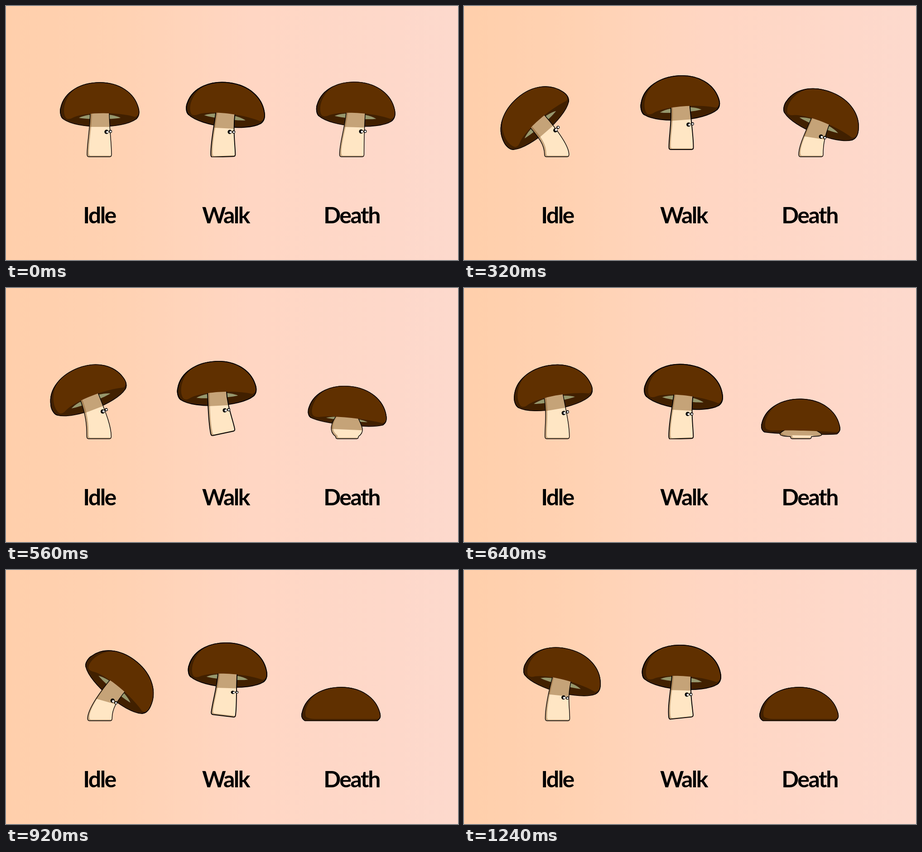
These frames come from a looping animation (998 px wide and 561 px high, 1280 ms). An HTML page with a canvas:

```html
<!DOCTYPE html>
<html lang="en">
<head>
<meta charset="utf-8">
<title>Mushroom animations</title>
<style>
  html, body { margin: 0; width: 100%; height: 100%; overflow: hidden; }
  body { background: linear-gradient(90deg, #ffcfab 0%, #ffd2b3 26%, #ffd6c3 54%, #fdd9cd 100%); }
  canvas, svg { position: absolute; left: 0; top: 0; width: 100%; height: 100%; }
  text { font: 700 50px Lato, "Open Sans", sans-serif; letter-spacing: -2.5px; text-anchor: middle; }
</style>
</head>
<body>
<canvas id="stage" width="998" height="561"></canvas>
<svg viewBox="0 0 998 561">
  <text x="206" y="480">Idle</text>
  <text x="485" y="480">Walk</text>
  <text x="763" y="480">Death</text>
</svg>
<script>
const ctx = document.getElementById('stage').getContext('2d');
const LOOP = 1280, STEP = 40, GROUND = 334;
const RAD = Math.PI / 180;

// time, cap x, cap y, cap tilt
const idleKeys = [
  [0, 207, 240, 0], [200, 174, 247, -28], [320, 164, 257, -41],
  [560, 185, 243, -21], [760, 222, 240, 11], [920, 244, 258, 40],
  [980, 245, 260, 42], [1240, 215, 244, 15], [1280, 207, 240, 0]
];
// time, cap x, cap y, cap tilt, foot y, foot tilt, eye opening
const walkKeys = [
  [0, 484, 240, 7, 333, -2, 1], [120, 503, 250, 32, 333, 0, .3],
  [200, 503, 248, 27, 333, 0, .35], [280, 489, 232, 4, 322, 7, .75],
  [320, 478, 225, -4, 317, 0, 1], [420, 464, 218, -9, 310, -7, 1],
  [520, 460, 227, -8, 317, -13, 1], [560, 466, 233, -3, 321, -12, 1],
  [600, 480, 237, 4, 327, -6, 1], [640, 484, 240, 7, 333, -2, 1]
];
// time, cap x, cap y, cap tilt, foot x, flatness
const deathKeys = [
  [0, 772, 239, 4, 763.5, 0], [200, 788, 247, 24, 766, 0],
  [320, 786, 257, 22, 766, 0], [440, 772, 271, 16, 761, .2],
  [560, 753, 288, 6, 753, .5], [700, 740, 330, 0, 740, 1],
  [1280, 740, 330, 0, 740, 1]
];

// Smooth interpolation that never overshoots a key
function sample(keys, t) {
  let i = 0;
  while (i < keys.length - 2 && t >= keys[i + 1][0]) i++;
  const a = keys[i], b = keys[i + 1], span = b[0] - a[0], u = (t - a[0]) / span;
  const rate = (j, c) => (keys[j + 1][c] - keys[j][c]) / (keys[j + 1][0] - keys[j][0]);
  const slope = (j, c) => {
    if (j === 0) return rate(0, c);
    if (j === keys.length - 1) return rate(j - 1, c);
    const p = rate(j - 1, c), q = rate(j, c);
    return p * q <= 0 ? 0 : 2 * p * q / (p + q);
  };
  return a.slice(1).map((v, n) => {
    const c = n + 1, w = 1 - u;
    return v * w * w * (1 + 2 * u) + b[c] * u * u * (3 - 2 * u)
      + span * u * w * (slope(i, c) * w - slope(i + 1, c) * u);
  });
}

function place(x, y, deg, draw) {
  ctx.save();
  ctx.translate(x, y);
  ctx.rotate(deg * RAD);
  draw();
  ctx.restore();
}

function offset(x, y, deg, dx, dy) {
  const c = Math.cos(deg * RAD), s = Math.sin(deg * RAD);
  return [x + dx * c - dy * s, y + dx * s + dy * c];
}

function dome(flat) {
  const c = 10 - 7 * flat, p = new Path2D();
  p.moveTo(-80, c);
  p.bezierCurveTo(-88, c - 5, -88, -10, -86, -16);
  p.bezierCurveTo(-78, -52, -40, -71, 0, -71);
  p.bezierCurveTo(44, -71, 76, -48, 85, -16);
  p.bezierCurveTo(88, -6, 87, c - 6, 80, c);
  return p;
}

function capBack(flat, line) {
  const p = dome(flat), low = 32 - 29 * flat;
  p.bezierCurveTo(50, low, -50, low, -80, 10 - 7 * flat);
  p.closePath();
  ctx.fillStyle = '#412000';
  ctx.fill(p);
  ctx.lineWidth = line;
  ctx.stroke(p);
  if (flat > .7) return;
  const g = 1 - flat;
  ctx.beginPath();
  ctx.moveTo(-46, 7 * g);
  ctx.bezierCurveTo(-25, -4, 25, -4, 46, 7 * g);
  ctx.bezierCurveTo(25, 11 * g, -25, 11 * g, -46, 7 * g);
  ctx.fillStyle = '#96976d';
  ctx.fill();
}

function capFront(flat, line) {
  const mix = (a, b) => a + (b - a) * flat;
  ctx.beginPath();
  ctx.moveTo(-74, mix(8, -4));
  ctx.bezierCurveTo(-84, -4, -80, -40, -50, -60);
  ctx.bezierCurveTo(-34, -69, -15, -71, 0, -71);
  ctx.bezierCurveTo(44, -71, 76, -48, 85, -16);
  ctx.bezierCurveTo(88, -6, 87, mix(2, -1), 78, mix(5, -1));
  ctx.bezierCurveTo(40, mix(-6, -1), -30, mix(-6, -1), -58, mix(6, -1));
  ctx.quadraticCurveTo(-68, mix(12, -1), -74, mix(8, -4));
  ctx.fillStyle = '#603000';
  ctx.fill();
  ctx.lineWidth = line;
  ctx.stroke(dome(flat));
}

function stemPath(m) {
  const h = m.by - m.y, k = h * .35, bulge = Math.max(0, 70 - h) * .6;
  const half = 27 - bulge * .12;
  const top = (dx, dy) => offset(m.x, m.y, m.tilt, dx, dy);
  const foot = (dx, dy) => offset(m.bx, m.by, m.footTilt, dx, dy);
  const p = new Path2D();
  p.moveTo(...top(-21, -9));
  p.bezierCurveTo(...top(-21 - bulge, k), ...foot(-half - bulge, -k), ...foot(-half, -5));
  p.quadraticCurveTo(...foot(-half, 0), ...foot(-half + 4, 0));
  p.lineTo(...foot(half - 4, 0));
  p.quadraticCurveTo(...foot(half, 0), ...foot(half, -5));
  p.bezierCurveTo(...foot(half + bulge, -k), ...top(21 + bulge, k), ...top(21, -9));
  p.closePath();
  return p;
}

function stem(m) {
  const p = stemPath(m), lean = Math.max(0, m.tilt);
  ctx.save();
  ctx.clip(p);
  ctx.fillStyle = '#c9a880';
  ctx.fill(p);
  ctx.translate(4, -2.5);
  ctx.fillStyle = '#ffe6c4';
  ctx.fill(p);
  ctx.translate(-4, 2.5);
  const depth = Math.min(27 + .45 * lean, (m.by - m.y) * .55);
  const [sx, sy] = offset(m.x, m.y, m.tilt, 0, depth);
  place(sx, sy, m.tilt > 0 ? m.tilt * .4 : m.tilt, () => {
    ctx.fillStyle = 'rgba(126, 81, 27, .45)';
    ctx.fillRect(-70, -90, 140, 90);
  });
  ctx.restore();
  ctx.lineWidth = m.line;
  ctx.stroke(p);
}

function disc(x, y, r, color) {
  ctx.beginPath();
  ctx.arc(x, y, r, 0, 7);
  ctx.fillStyle = color;
  ctx.fill();
}

function eyes(m) {
  const reach = Math.min(1, (Math.hypot(m.x - m.bx, m.y - m.by) - 45) / 40);
  if (reach < .35) return;
  const ex = 15 - .05 * m.tilt;
  const ey = (38 - .2 * Math.max(0, m.tilt)) * reach;
  place(...offset(m.x, m.y, m.tilt, ex, ey), m.tilt, () => {
    ctx.scale(1, m.open);
    disc(0, 0, 4.7, '#000');
    disc(1.8, .3, 2.4, '#fff');
    disc(8.6, -1, 3.5, '#000');
    disc(9, -.8, 2, '#fff');
  });
}

function mushroom(pose) {
  const m = { by: 333, footTilt: 0, open: 1, flat: 0, line: 1.4, ...pose };
  place(m.x, m.y, m.tilt, () => capBack(m.flat, m.line));
  if (m.by - m.y > 12) {
    stem(m);
    eyes(m);
  }
  place(m.x, m.y, m.tilt, () => capFront(m.flat, m.line));
}

function idle(t) {
  const [x, y, tilt] = sample(idleKeys, t);
  mushroom({ x, y, tilt, bx: 206 + tilt * .03 });
}

function walk(t) {
  const [x, y, tilt, by, footTilt, open] = sample(walkKeys, t % 640);
  mushroom({ x, y, tilt, bx: 479.5, by, footTilt, open, line: 1.9 });
}

function death(t) {
  const [x, y, tilt, bx, flat] = sample(deathKeys, t);
  mushroom({ x, y, tilt, bx, flat });
}

function render() {
  const t = Math.floor(performance.now() % LOOP / STEP) * STEP;
  ctx.clearRect(0, 0, 998, 561);
  ctx.save();
  ctx.beginPath();
  ctx.rect(0, 0, 998, GROUND);
  ctx.clip();
  ctx.strokeStyle = '#000';
  ctx.lineJoin = 'round';
  idle(t);
  walk(t);
  death(t);
  ctx.restore();
  requestAnimationFrame(render);
}
render();
</script>
</body>
</html>
```
